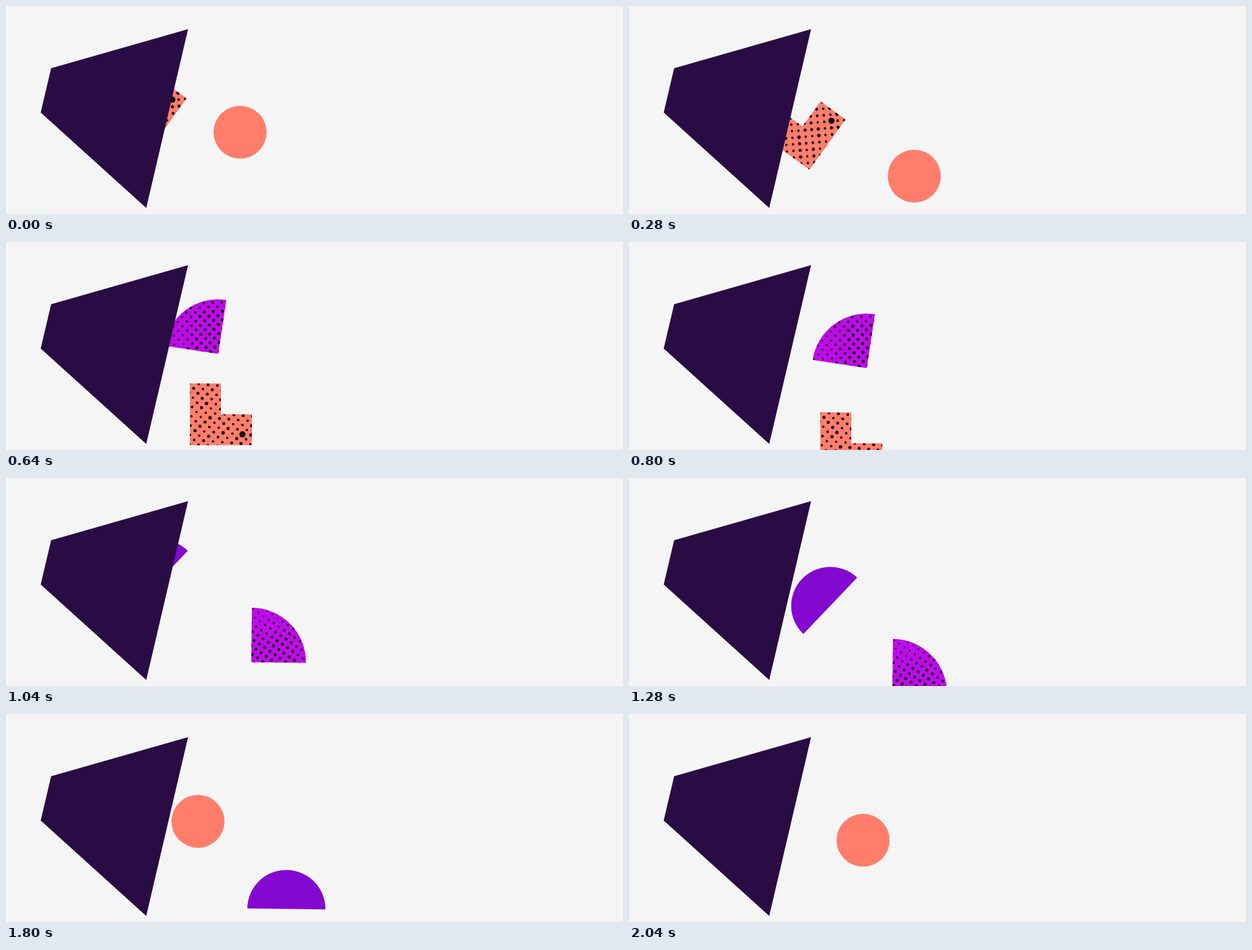
Write an HTML page with a canvas that moves like this. It is 916 by 310 pixels and loops after 2.08 s.

```html
<!DOCTYPE html>
<html lang="en">
<head>
<meta charset="utf-8">
<title>Falling shapes</title>
<style>
  html, body { margin: 0; width: 100%; height: 100%; overflow: hidden; background: #f5f5f5; }
  canvas { display: block; }
</style>
</head>
<body>
<canvas id="stage" width="916" height="310"></canvas>
<script>
const ctx = document.getElementById('stage').getContext('2d');
const LOOP = 2080, STEP = 40;
const CORAL = '#ff7e6b', PINK = '#bd0bea', VIOLET = '#8309d0', DARK = '#2a0c45', INK = '#160312';
const rad = deg => deg * Math.PI / 180;
const clamp = (v, lo, hi) => Math.min(hi, Math.max(lo, v));
const mix = (a, b, k) => a + (b - a) * k;

function ease(t, from, to) {
  const k = clamp((t - from) / (to - from), 0, 1);
  return k < 0.5 ? 2 * k * k : 1 - 2 * (1 - k) * (1 - k);
}

function polygon(points) {
  ctx.beginPath();
  points.forEach(([x, y]) => ctx.lineTo(x, y));
  ctx.closePath();
}

function dot(x, y, r) {
  ctx.beginPath();
  ctx.arc(x, y, r, 0, 7);
  ctx.fill();
}

// Square lattice of dots, clipped to the current path
function halftone(ox, oy, gap, deg, radius) {
  ctx.clip();
  ctx.fillStyle = INK;
  const c = gap * Math.cos(rad(deg)), s = gap * Math.sin(rad(deg));
  for (let i = -12; i <= 12; i++) {
    for (let j = -12; j <= 12; j++) {
      const x = ox + i * c + j * s, y = oy + i * s - j * c;
      if (Math.hypot(x, y) < 75) dot(x, y, radius(x, y, i, j));
    }
  }
}

function drawCorner() {
  polygon([[-46, -46], [0, -46], [0, 0], [46, 0], [46, 46], [-46, 46]]);
  ctx.fillStyle = CORAL;
  ctx.fill();
  halftone(-33, -45, 9.85, 49.5, (x, y, i, j) => {
    const n = Math.abs(Math.sin(i * 12.9 + j * 78.2) * 437.5) % 1;
    return 1.75 + 0.9 * n * n;
  });
  dot(32, 30, 4.6);
}

function drawQuarter() {
  ctx.beginPath();
  ctx.moveTo(34, 46);
  ctx.arc(34, 46, 81.3, rad(188.6), rad(278.6));
  ctx.closePath();
  ctx.fillStyle = PINK;
  ctx.fill();
  halftone(26, -30.5, 9.4, 42.4, (x, y) => {
    const r = 1.2 + (x + 38) / 42;
    return clamp(y < -20 ? Math.min(r, 1.9) : r, 1, 2.3);
  });
}

function drawHalf() {
  ctx.beginPath();
  ctx.arc(0, 0, 58, rad(180.7), rad(360.7));
  ctx.closePath();
  ctx.fillStyle = VIOLET;
  ctx.fill();
}

function drawDisc() {
  ctx.fillStyle = CORAL;
  dot(0, 0, 39.4);
}

// path: inside the cone, out of it, turned; fall: offset after 280 ms of falling
const shapes = [
  { draw: drawCorner, start: 0, lead: 0, turn: [-54.3, 0],
    path: [[204, 148], [257.5, 179.5], [310, 241]], fall: [20, 59] },
  { draw: drawQuarter, start: 520, lead: 40, turn: [0, 82.1],
    path: [[243, 99.5], [319, 142], [405, 234.6]], fall: [31, 59] },
  { draw: drawHalf, start: 1040, lead: 40, turn: [-47.2, 0],
    path: [[230, 150.5], [298.8, 190.5], [350.5, 239]], fall: [76, 65.5] },
  { draw: drawDisc, start: 1560, lead: 0, turn: [0, 0],
    path: [[165, 106], [285, 160], [347.5, 188.2]], fall: [76, 65.5] }
];

function drawShape({ draw, start, lead, turn, path, fall }, now) {
  let t = (now - start + LOOP) % LOOP;
  if (t >= LOOP - lead) t = 0;
  const out = ease(t, 0, 240), roll = ease(t, 280, 480);
  const drop = Math.max(0, t - 520) / 280;
  const at = (axis, power) =>
    mix(mix(path[0][axis], path[1][axis], out), path[2][axis], roll) +
    fall[axis] * Math.pow(drop, power);
  ctx.save();
  ctx.translate(at(0, 0.94), at(1, 1.563));
  ctx.rotate(rad(mix(turn[0], turn[1], roll)));
  draw();
  ctx.restore();
}

function frame(ms) {
  const now = Math.floor((ms % LOOP) / STEP) * STEP;
  ctx.fillStyle = '#f5f5f5';
  ctx.fillRect(0, 0, 916, 310);
  shapes.forEach(shape => drawShape(shape, now));
  polygon([[67, 92.8], [270.3, 34.5], [208.2, 301], [51.5, 158.8]]);
  ctx.fillStyle = DARK;
  ctx.fill();
}

const begin = performance.now();
function loop() {
  frame(performance.now() - begin);
  requestAnimationFrame(loop);
}
loop();
</script>
</body>
</html>
```
